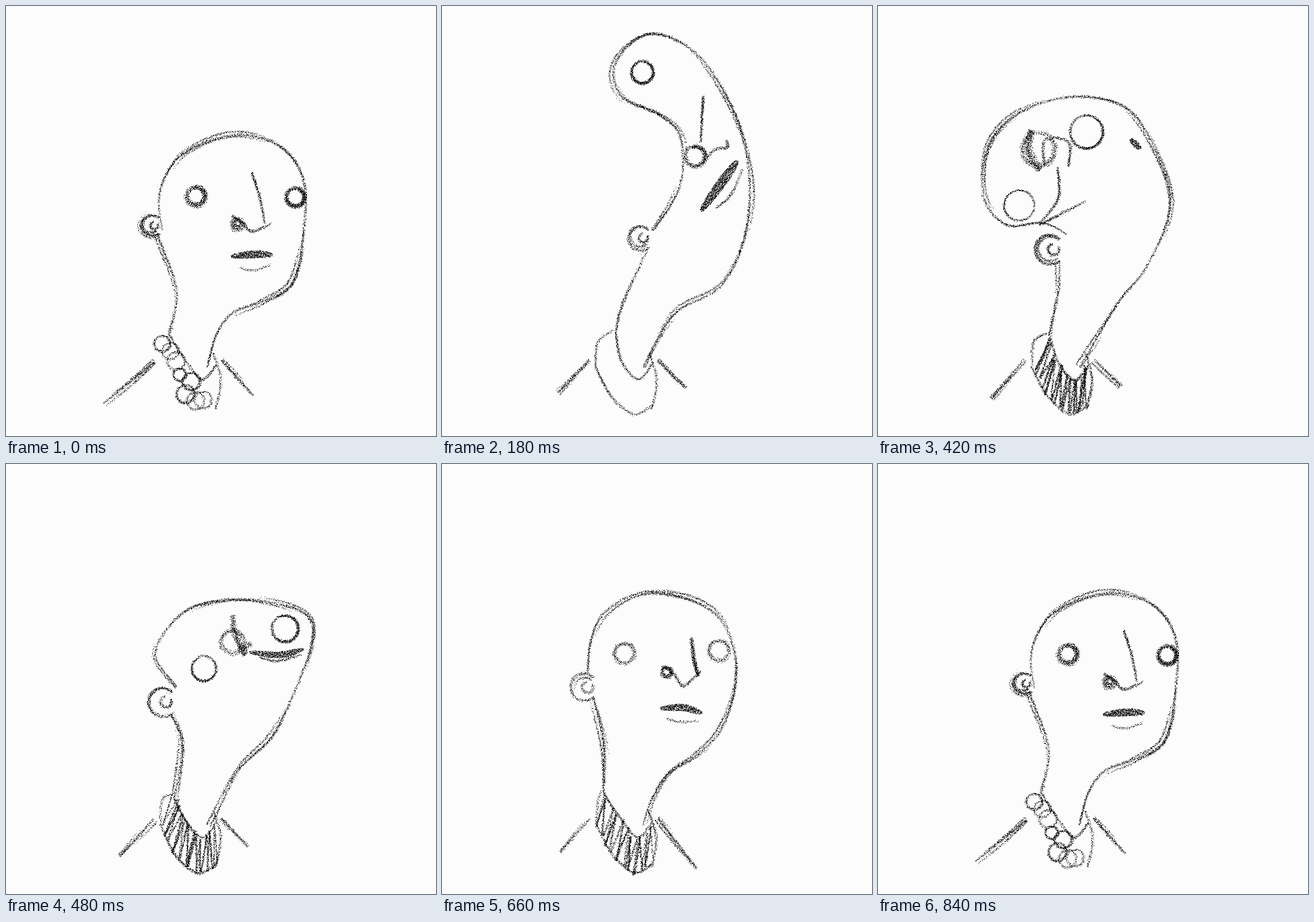
Recreate the animation shown at these times as an HTML page with a canvas. Size 720 px wide and 720 px high, loop 0.93 s.

```html
<!DOCTYPE html>
<html lang="en">
<head>
<meta charset="utf-8">
<title>Pencil head turn</title>
<style>
html, body { margin: 0; width: 100%; height: 100%; overflow: hidden; background: #fcfcfc; }
canvas { display: block; width: 720px; height: 720px; }
</style>
</head>
<body>
<canvas id="stage" width="720" height="720"></canvas>
<script>
const SIZE = 720, LOOP = 930, STEP = 30;
const HELD = [90, 150, 210, 510, 570, 630, 690, 810];

// Key poses. Only a few controls each; everything else is derived in draw().
// head: outline from above the ear to the throat     neck: nape and collar point
// eye: x, y, radius, weight, tone                    nostril: the same
// bridge: weight, then three points                  base: four points under the nose
// mouth: both corners, bow, thickness, lip offset    ear: x, y, radius
// shoulders: left and right tips
const front = {
  head: [262,375, 257,315, 285,255, 345,223, 405,217, 465,240, 498,290, 500,360, 480,460, 430,494, 380,514, 352,550],
  neck: [284,475, 272,548],
  eyeL: [318,318, 16, 10, .75], eyeR: [484,320, 16, 8, .95],
  bridge: [5, 412,278, 424,320, 432,365], base: [378,350, 396,362, 412,377, 444,364],
  nostril: [387,365, 8, 12, .6],
  mouth: [376,419, 446,416, -2, 13, 27],
  ear: [243,367, 18], shoulders: [163,666, 414,652],
  collar: { loops: 8, hatch: 0 }
};
const stretched = {
  head: [352,376, 398,300, 400,220, 365,183, 300,152, 290,95, 350,47, 435,88, 500,210, 514,350, 470,463, 390,515],
  neck: [305,490, 291,545],
  eyeL: [335,111, 19, 6, .95],
  bridge: [5, 438,150, 435,185, 432,228], base: [443,256, 458,240, 478,237, 476,224],
  nostril: [424,251, 17, 8, .9],
  mouth: [433,343, 494,259, 0, 16, 24],
  ear: [332,388, 20], shoulders: [193,646, 407,640],
  collar: { loops: 0, hatch: 0 }
};
const leaning = {
  head: [356,372, 382,323, 368,270, 300,276, 225,296, 183,235, 215,147, 345,121, 450,180, 508,290, 470,440, 395,518],
  neck: [309,490, 299,550],
  eyeL: [238,225, 23, 5, .7], eyeR: [382,200, 23, 4, .8],
  bridge: [9, 300,193, 300,160, 325,137], base: [325,137, 340,140, 349,150, 353,160],
  nostril: [322,167, 12, 4, .25],
  mouth: [432,190, 476,246, 0, 31, 0],
  ear: [336,386, 23], shoulders: [204,659, 432,660],
  crease: [318,266, 326,260, 333,249],
  collar: { loops: 0, hatch: 9 }
};
const curled = {
  head: [316,381, 275,363, 215,367, 177,320, 185,235, 235,178, 320,152, 410,168, 460,230, 488,330, 450,435, 400,500],
  neck: [301,475, 287,552],
  eyeL: [236,333, 25, 4, .8], eyeR: [349,211, 28, 5, .9],
  bridge: [15, 256,207, 250,240, 269,276], base: [278,268, 280,225, 318,228, 318,268],
  nostril: [268,240, 28, 10, .35],
  mouth: [422,222, 439,239, 0, 11, 0],
  ear: [287,407, 25], shoulders: [189,656, 407,636],
  crease: [270,365, 305,348, 348,327], cheek: [301,270, 302,322, 268,366],
  collar: { loops: 0, hatch: 15 }
};
const snout = {
  head: [255,365, 255,335, 285,275, 350,250, 430,248, 520,273, 585,315, 604,348, 560,385, 480,430, 440,475, 375,525],
  neck: [288,462, 275,560],
  eyeL: [425,352, 17, 6, .7], eyeR: [586,340, 17, 7, .95],
  bridge: [6, 500,298, 515,332, 530,365], base: [530,365, 520,381, 503,374, 478,350],
  nostril: [490,354, 9, 8, .8],
  mouth: [391,407, 557,380, 15, 11, 25],
  ear: [237,389, 23], shoulders: [190,656, 402,645],
  collar: { loops: 0, hatch: 12 }
};
const settling = {
  head: [243,347, 247,300, 270,250, 330,217, 400,222, 460,252, 488,310, 488,380, 465,448, 425,488, 380,515, 350,560],
  neck: [271,470, 271,550],
  eyeL: [305,316, 16, 8, .7], eyeR: [463,312, 16, 8, .65],
  bridge: [7, 417,290, 422,325, 430,355], base: [368,338, 388,352, 404,372, 433,347],
  nostril: [376,348, 9, 8, .65],
  mouth: [365,409, 435,417, -6, 12, 22],
  ear: [238,373, 22], shoulders: [198,650, 427,677],
  collar: { loops: 0, hatch: 11 }
};
const keys = [
  [0, front], [180, stretched], [300, leaning], [420, curled],
  [540, snout], [660, settling], [840, front]
];

const linear = t => t;
const easeInOut = t => t * t * (3 - 2 * t);
const easeOut = t => 1 - (1 - t) ** 2;
const mix = (a, b, t) => a + (b - a) * t;

function poseAt(time) {
  const last = keys.length - 2;
  const i = Math.min(last, keys.findLastIndex(([start]) => start <= time));
  const [start, from] = keys[i], [end, to] = keys[i + 1];
  const ease = i === 0 ? easeInOut : i === last ? easeOut : linear;
  const t = ease((time - start) / (end - start));
  const pose = { ...(t < .5 ? from : to) };
  for (const part in pose)
    if (part !== "collar" && from[part] && to[part])
      pose[part] = from[part].map((value, k) => mix(value, to[part][k], t));
  return pose;
}

function randomFrom(seed) {
  return () => {
    seed = seed + 0x6D2B79F5 | 0;
    let r = Math.imul(seed ^ seed >>> 15, 1 | seed);
    r ^= r + Math.imul(r ^ r >>> 7, 61 | r);
    return ((r ^ r >>> 14) >>> 0) / 4294967296;
  };
}

// Smooth line through flat x, y pairs.
function curve(flat) {
  const count = flat.length / 2, points = [];
  const at = (i, axis) => flat[Math.max(0, Math.min(count - 1, i)) * 2 + axis];
  for (let i = 0; i < count - 1; i++)
    for (let t = 0; t < 1; t += 1 / 16)
      points.push([0, 1].map(axis => {
        const [a, b, c, d] = [-1, 0, 1, 2].map(k => at(i + k, axis));
        return b + .5 * t * (c - a + t * (2 * a - 5 * b + 4 * c - d + t * (3 * (b - c) + d - a)));
      }));
  points.push(flat.slice(-2));
  return points;
}

function arc(x, y, r, from = -2, to = from + Math.PI * 2) {
  return Array.from({ length: 41 }, (_, i) => {
    const a = mix(from, to, i / 40);
    return [x + r * Math.cos(a), y + r * Math.sin(a)];
  });
}

const pointOn = (points, t) => points[Math.round(t * (points.length - 1))];

function draw(ctx, pose, random) {
  // Graphite grain: specks scattered across the path, denser where the hand presses.
  function grain(points, widthAt, toneAt, driftAt, spread) {
    let travelled = 0;
    for (let i = 1; i < points.length; i++) {
      const [x0, y0] = points[i - 1], [x1, y1] = points[i];
      const length = Math.hypot(x1 - x0, y1 - y0) || .01;
      const nx = (y0 - y1) / length, ny = (x1 - x0) / length;
      const width = widthAt(i / points.length), drift = driftAt(travelled);
      const specks = length * width * toneAt(travelled) * 1.4;
      for (let n = Math.floor(specks + random()); n > 0; n--) {
        const t = random(), offset = spread() * width + drift;
        ctx.globalAlpha = .25 + .75 * random();
        ctx.fillRect(Math.round(mix(x0, x1, t) + nx * offset), Math.round(mix(y0, y1, t) + ny * offset), 1, 1);
      }
      travelled += length;
    }
  }
  function line(points, width = 5, tone = .6) {
    const phase = random() * 6;
    grain(points, t => width * (.6 + .4 * Math.sqrt(Math.sin(Math.PI * t))),
      s => tone * (.95 + .35 * Math.sin(s / 33 + phase)),
      s => Math.sin(s / 41 + phase), () => (random() + random() - 1) * .62);
  }
  // A line gone over again, lightly and a little off.
  function sketch(points, width, tone) {
    line(points, width, tone);
    for (const side of [-4, 4]) {
      const phase = random() * 6;
      grain(points, () => width * .8, s => tone * .8 * Math.max(0, Math.sin(s / 60 + phase)),
        s => side + 2 * Math.sin(s / 35 + phase), () => (random() + random() - 1) * .6);
    }
  }
  function blob(points, thickness) {
    grain(points, t => thickness * Math.sqrt(Math.sin(Math.PI * t)), () => 1.1, () => 0, () => random() - .5);
  }
  const ring = ([x, y, radius, width, tone]) => line(arc(x, y, radius), width, tone);

  function drawMouth([x0, y0, x1, y1, bow, thickness, lip]) {
    const length = Math.hypot(x1 - x0, y1 - y0);
    const away = (t, d) => [mix(x0, x1, t) - (y1 - y0) / length * d, mix(y0, y1, t) + (x1 - x0) / length * d];
    blob(curve([x0, y0, ...away(.55, bow), x1, y1]), thickness);
    if (lip > 5) line(curve([...away(.18, lip * .7), ...away(.5, lip + bow / 2), ...away(.95, lip * .65)]), 5, .45);
  }

  function drawEar([x, y, r]) {
    sketch(arc(x, y, r, .8, 5.5), 6, .6);
    line(arc(x + r * .25, y, r * .38, -.6, 4.6), 6, .65);
  }

  function drawCollar(top, { loops, hatch }) {
    const inner = curve([...top, 300,595, 328,626, 352,600]);
    const outer = curve([257,602, 284,654, 321,684, 353,668]);
    line(inner, 5, .65);
    line(curve([346,580, 358,625, 350,675]), 5, .55);
    if (!loops) {
      line(outer, 5, .55);
      line(curve([top[0] - 5, top[1] - 4, 260,562, 257,602]), 5, .45);
    }
    for (let i = 0; i < loops; i++) {
      const [a, b] = [inner, outer].map(edge => pointOn(edge, i / loops * .8));
      const [x, y] = [0, 1].map(k => mix(a[k], b[k], .2 + .6 * random()));
      line(arc(x, y, 10 + 6 * random()), 5, .55);
    }
    const zigzag = [];
    for (let i = 0; i < hatch * 2; i++)
      zigzag.push(pointOn(i % 2 ? outer : inner, i / (hatch * 2)).map(v => v + 8 * random() - 4));
    line(zigzag.flatMap((p, i) => i ? arcless(zigzag[i - 1], p) : [p]), 4, .65);
  }
  const arcless = (a, b) => Array.from({ length: 8 }, (_, i) => a.map((v, k) => mix(v, b[k], (i + 1) / 8)));

  const { head, neck, ear, shoulders: [lx, ly, rx, ry] } = pose;
  const collarTop = neck.slice(2);
  sketch(curve([...head, 336,604]), 5, .6);
  sketch(curve([ear[0] + ear[2] * .6, ear[1] + ear[2] * .8, ...neck]), 5, .55);
  sketch(curve([lx, ly, 248,594]), 5, .6);
  sketch(curve([361,592, rx, ry]), 5, .6);
  drawCollar(collarTop, pose.collar);
  drawEar(ear);
  line(curve(pose.bridge.slice(1)), pose.bridge[0], .9);
  line(curve(pose.base), 6, .75);
  for (const part of ["eyeL", "eyeR", "nostril"]) if (pose[part]) ring(pose[part]);
  for (const part of ["crease", "cheek"]) if (pose[part]) line(curve(pose[part]), 5, .65);
  drawMouth(pose.mouth);
}

function sheetAt(time) {
  const sheet = document.createElement("canvas");
  sheet.width = sheet.height = SIZE;
  const ctx = sheet.getContext("2d");
  ctx.fillStyle = "#fcfcfc";
  ctx.fillRect(0, 0, SIZE, SIZE);
  ctx.fillStyle = "#000";
  draw(ctx, poseAt(time), randomFrom(time * 31 + 5));
  return sheet;
}

const sheets = [];
for (let time = 0; time < 840; time += STEP)
  sheets.push(HELD.includes(time) ? sheets.at(-1) : sheetAt(time));

const stage = document.getElementById("stage").getContext("2d");
let shown;
function show() {
  const step = Math.floor(performance.now() % LOOP / STEP);
  const sheet = sheets[step] || sheets[0];
  if (sheet !== shown) stage.drawImage(shown = sheet, 0, 0);
  requestAnimationFrame(show);
}
show();
</script>
</body>
</html>
```
